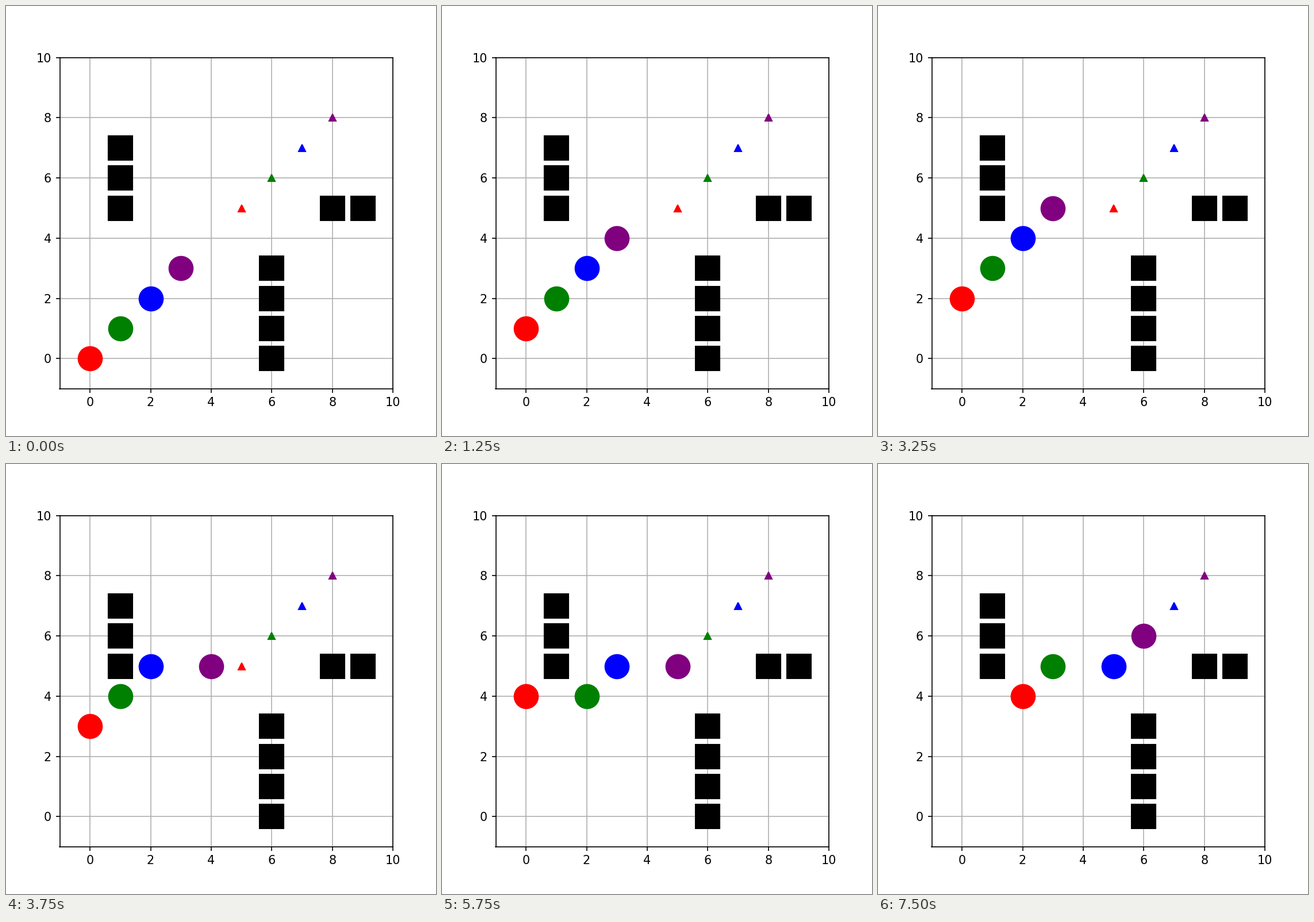
A matplotlib script for the animation above (8000 ms loop, 748x748 px).

```python
import matplotlib.pyplot as plt
from matplotlib.animation import FuncAnimation

INTERVAL = 250
FRAMES = 32
FRAMES_PER_STEP = 5

# colour: start cell, goal cell, moves (U = up, R = right)
ROBOTS = {
    "red": ((0, 0), (5, 5), "UUUURR"),
    "green": ((1, 1), (6, 6), "UUURRU"),
    "blue": ((2, 2), (7, 7), "UUURRR"),
    "purple": ((3, 3), (8, 8), "UURRRU"),
}
WALLS = (
    [(1, y) for y in (5, 6, 7)]
    + [(6, y) for y in range(4)]
    + [(x, 5) for x in (8, 9)]
)


def cell_at(start, moves, step):
    done = moves[:step]
    return start[0] + done.count("R"), start[1] + done.count("U")


plt.rcParams["font.family"] = "DejaVu Sans"
fig, ax = plt.subplots(figsize=(5, 5), dpi=149.6)
ax.set_xlim(-1, 10)
ax.set_ylim(-1, 10)
ax.set_xticks(range(0, 11, 2))
ax.set_yticks(range(0, 11, 2))
ax.grid(True)

for x, y in WALLS:
    ax.plot(x, y, "s", color="black", markersize=20)
for color, (_, goal, _) in ROBOTS.items():
    ax.plot(*goal, "^", color=color, markersize=6)

discs = [
    ax.plot(*start, "o", color=color, markersize=20)[0]
    for color, (start, _, _) in ROBOTS.items()
]


def update(frame):
    step = frame // FRAMES_PER_STEP
    for disc, (start, _, moves) in zip(discs, ROBOTS.values()):
        x, y = cell_at(start, moves, step)
        disc.set_data([x], [y])
    return discs


anim = FuncAnimation(fig, update, frames=FRAMES, interval=INTERVAL,
                     init_func=lambda: update(0), repeat=True)
plt.show()
```
